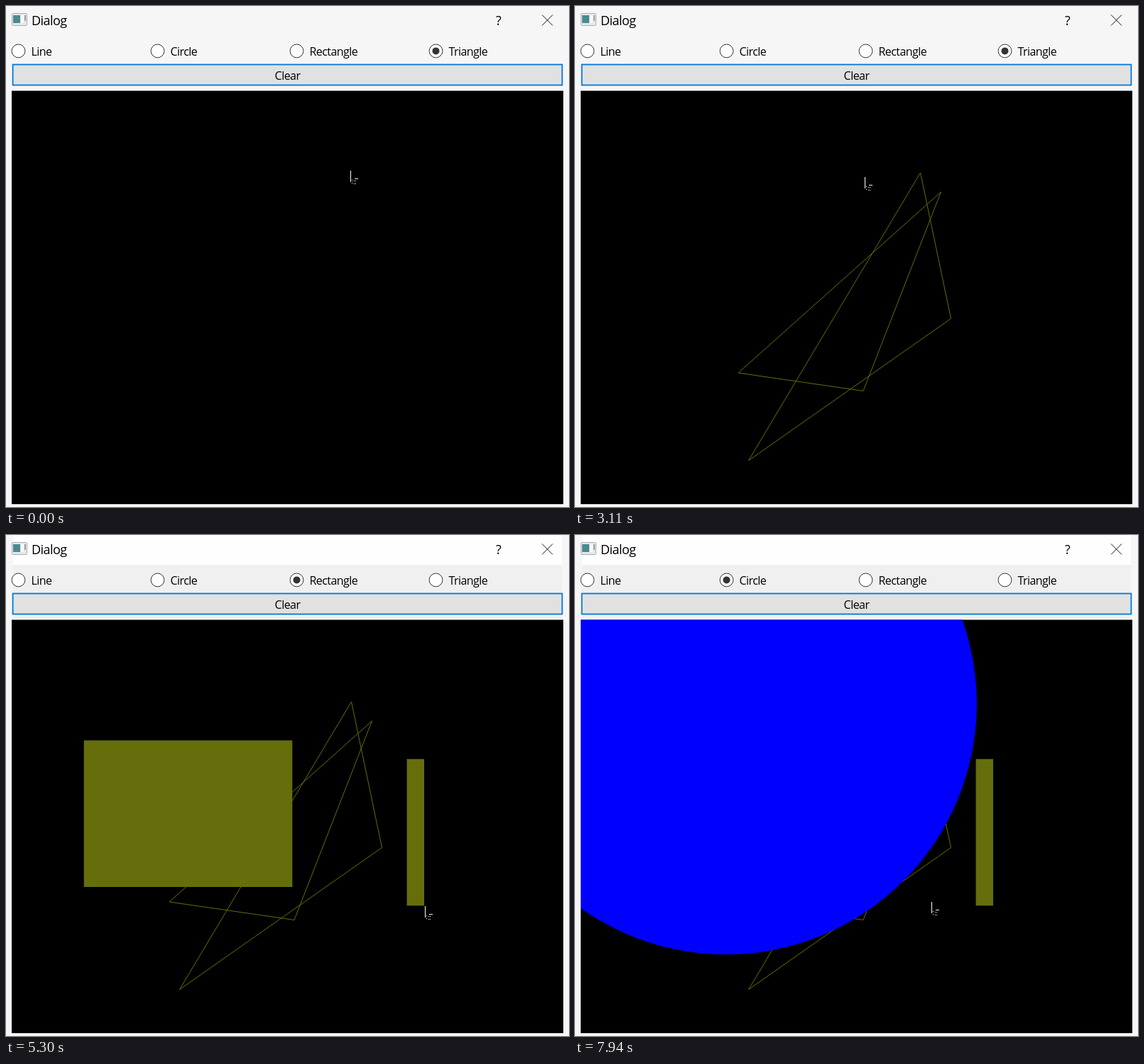
Animation of 793x706 px, one loop 8000 ms. Source, as an HTML page:

```html
<!DOCTYPE html>
<html lang="en">
<head>
<meta charset="utf-8">
<title>Dialog</title>
<style>
html, body { margin: 0; height: 100%; overflow: hidden; background: #f6f6f6; }
svg { display: block; width: 793px; height: 706px; }
text { font: 16px "Open Sans", "Noto Sans", sans-serif; letter-spacing: -.55px; }
.title { font-size: 18px; }
.crisp { shape-rendering: crispEdges; }
</style>
</head>
<body>
<!-- data-on holds the time spans in ms when a part shows; no end means until the loop ends -->
<svg viewBox="0 0 793 706">
  <defs><clipPath id="board"><rect x="8" y="119.6" width="777" height="582.4"/></clipPath></defs>

  <g data-on="3230" class="crisp">
    <rect x="10" width="773" height="42" fill="#fefefe"/>
    <rect x="10" y="42" width="773" height="78" fill="#f0f0f0"/>
  </g>

  <rect x="8.5" y="10.5" width="21" height="17" rx="1" fill="#e6e8ea" stroke="#a9adb0"/>
  <rect x="10" y="13" width="10" height="11" fill="#4b8a90"/>
  <rect x="21" y="13" width="4" height="11" fill="#f8f8f8"/>
  <rect x="26" y="13" width="2" height="8" fill="#8fa3a8"/>
  <text class="title" x="36" y="27">Dialog</text>
  <text class="title" x="690" y="27">?</text>
  <path d="M755 12.5l15 15m0-15l-15 15" stroke="#111"/>

  <g id="radios"></g>

  <rect x="9.6" y="82.5" width="773.8" height="29" fill="#e1e1e1" stroke="#0078d7" stroke-width="1.8"/>
  <rect data-on="3230-3380 6360-6520" x="10" y="83" width="773" height="28.5" fill="#e5ecf5"/>
  <text x="396.5" y="104" text-anchor="middle">Clear</text>

  <g clip-path="url(#board)">
    <rect x="8" y="119" width="777" height="583"/>
    <g fill="none" stroke="#656e0b">
      <path data-on="450" d="M486.5 235L529.5 440.5 244.5 640.5Z"/>
      <path data-on="2140" d="M515.5 262L406 542.5 230 517Z"/>
    </g>
    <g fill="#656e0b">
      <rect data-on="4380" x="109.7" y="289.4" width="293.6" height="206.6"/>
      <rect data-on="5300" x="564.6" y="315.7" width="24.4" height="206.6"/>
      <rect data-on="6130" x="253.6" y="153.2" width="278" height="66.2"/>
    </g>
    <circle data-on="7760" cx="212.5" cy="237.7" r="353.4" fill="#00f"/>
  </g>

  <g id="cursor" class="crisp">
    <path d="M0 0V16L4 13 6 19 9 18 7 12 11 11Z"/>
    <path d="M.5 0v16M6 11.5h5" stroke="#fff"/>
    <path d="M2.5 13v6M5.5 14v6M7.5 14v5" stroke="#fff" stroke-dasharray="1 3"/>
  </g>
</svg>
<script>
const LOOP = 8000;

// label, checked span, hovered span
const radios = [
  ["Line"],
  ["Circle", "6920", "6520-6997"],
  ["Rectangle", "3510-6920", "3380-3587"],
  ["Triangle", "0-3510"]
];
const circle = (x, r, fill, stroke, on) => `<circle cx="${x}" cy="63.4" r="${r}"
  fill="${fill}" stroke="${stroke}" ${on ? `data-on="${on}"` : ""}/>`;
document.getElementById("radios").innerHTML = radios.map(([label, checked, hovered], i) => {
  const x = 17.5 + 196 * i;
  return circle(x, 9.4, "#fff", "#333") +
    (hovered ? circle(x, 9.4, "#fff", "#0078d7", hovered) : "") +
    (checked ? circle(x, 5, "#333", "none", checked) : "") +
    `<text x="${x + 18}" y="70">${label}</text>`;
}).join("");

// Cursor stops: arrival time, travel time, x, y
const stops = [
  [0, 1, 485, 232],
  [70, 1, 486, 234],
  [450, 280, 529, 440],
  [1390, 230, 230, 430],
  [1740, 150, 230, 517],
  [1980, 230, 515, 262],
  [2140, 150, 406, 541],
  [3430, 770, 409, 62],
  [3890, 380, 110, 290],
  [4210, 230, 403, 497],
  [4840, 370, 565, 317],
  [5300, 380, 590, 523],
  [5630, 230, 531, 219],
  [5880, 240, 255, 153],
  [6440, 310, 209, 72],
  [6670, 150, 211, 62],
  [7240, 320, 212, 238],
  [7690, 380, 427, 518],
  [7940, 1, 502, 517]
];
const ease = p => p * p * (3 - 2 * p);

function cursorAt(t) {
  let x = 0, y = 0;
  for (const [arrive, travel, toX, toY] of stops) {
    const p = ease(Math.min(1, Math.max(0, 1 + (t - arrive) / travel)));
    x += (toX - x) * p;
    y += (toY - y) * p;
  }
  return [Math.round(x), Math.round(y)];
}

const cursor = document.getElementById("cursor");
const timed = [...document.querySelectorAll("[data-on]")].map(el =>
  [el, el.dataset.on.split(" ").map(span => span.split("-").map(Number))]);

function draw(t) {
  for (const [el, spans] of timed) {
    const shown = spans.some(([from, to = LOOP]) => t >= from && t < to);
    el.style.display = shown ? "" : "none";
  }
  cursor.setAttribute("transform", `translate(${cursorAt(t)})`);
}

let begin;
function frame(now) {
  begin ??= now;
  draw((now - begin) % LOOP);
  requestAnimationFrame(frame);
}
draw(0);
requestAnimationFrame(frame);
</script>
</body>
</html>
```
